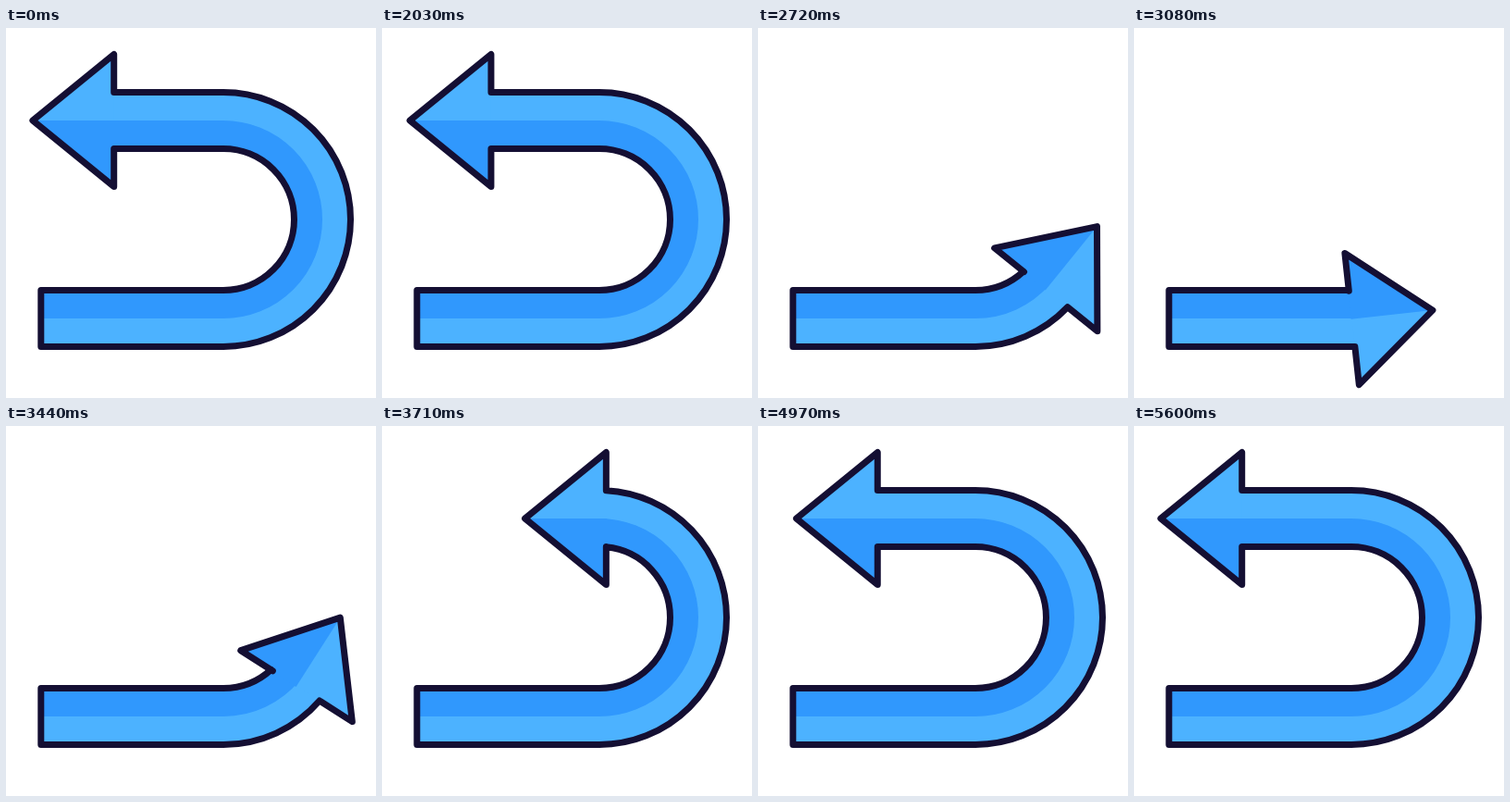
An HTML page with a canvas for the animation above (5.63 s loop, 400 px wide and 400 px high).

```html
<!DOCTYPE html>
<html lang="en">
<head>
<meta charset="utf-8">
<title>Return arrow</title>
<style>
  html, body { margin: 0; width: 100%; height: 100%; overflow: hidden; background: #fff; }
  canvas { display: block; width: 100vmin; height: 100vmin; }
</style>
</head>
<body>
<canvas id="stage" width="400" height="400"></canvas>
<script>
const ctx = document.getElementById('stage').getContext('2d');

const LOOP = 5630;
const LIGHT = '#4cb2ff', DARK = '#3098fd', INK = '#140f33';
const CX = 235, CY = 207, R = 107;     // bend of the shaft
const HALF = 30.5, START = 37.8;       // half thickness, left end
const BEND = Math.PI * R;
const REST = BEND + 118.3;             // distance of the head's base past the bend's start
const HEAD_LENGTH = 87.8, HEAD_HALF = 71.5;
const PIN = 10;                        // point of the head that rides on the course

// Each move: start, end, from, to, and the two horizontal easing handles.
const MOVES = [
  [2020, 3110, REST, 0, 0.1, 0.567],
  [3110, 4200, 0, REST + 25, 0.509, 0.391],
  [4200, 4930, REST + 25, REST - 12.7, 0.333, 0.667],
  [4930, 5600, REST - 12.7, REST, 0.333, 0.667]
];
const TURN = MOVES[1][0];

const clamp = (v, lo, hi) => Math.min(hi, Math.max(lo, v));

function ease(u, x1, x2) {
  let lo = 0, hi = 1;
  for (let i = 0; i < 24; i++) {
    const m = (lo + hi) / 2, n = 1 - m;
    const x = 3 * n * n * m * x1 + 3 * n * m * m * x2 + m * m * m;
    if (x < u) lo = m; else hi = m;
  }
  return lo * lo * (3 - 2 * lo);
}

function distanceAt(time) {
  for (const [start, end, from, to, x1, x2] of MOVES) {
    if (time >= start && time < end) {
      return from + (to - from) * ease((time - start) / (end - start), x1, x2);
    }
  }
  return REST;
}

// Traces the shaft's course at radius r, up to distance s past the bend's start.
function trace(r, s) {
  ctx.moveTo(START, CY + r);
  ctx.lineTo(CX + Math.min(s, 0), CY + r);
  if (s > 0) ctx.arc(CX, CY, r, Math.PI / 2, Math.PI / 2 - Math.min(s, BEND) / R, true);
  if (s > BEND) ctx.lineTo(CX - (s - BEND), CY - r);
}

function band(r, width, s, color) {
  ctx.beginPath();
  trace(r, s);
  ctx.lineCap = 'butt';
  ctx.lineWidth = width;
  ctx.strokeStyle = color;
  ctx.stroke();
}

function pointAt(s) {
  if (s > BEND) return [CX - (s - BEND), CY - R];
  const a = Math.max(s, 0) / R;
  return [CX + R * Math.sin(a) + Math.min(s, 0), CY + R * Math.cos(a)];
}

function polygon(points, color) {
  ctx.beginPath();
  points.forEach(p => ctx.lineTo(...p));
  ctx.closePath();
  ctx.fillStyle = color;
  ctx.fill();
}

function draw(time) {
  const s = distanceAt(time);
  const lead = time < TURN ? 11 : 11 + 9 * clamp(s / 80, 0, 1);
  const heading = clamp((s + lead) / R, 0, Math.PI);
  const skew = heading - clamp(s / R, 0, Math.PI);
  const shift = HALF * Math.sin(skew);

  const [px, py] = pointAt(s + PIN);
  const cos = Math.cos(heading), sin = Math.sin(heading);
  // Head coordinates: forward from its base, side away from the bend's centre.
  const at = (forward, side) => [
    px + (forward - PIN) * cos + side * sin,
    py - (forward - PIN) * sin + side * cos
  ];
  const tip = at(HEAD_LENGTH, 0);
  const inner = at(0, -HEAD_HALF), outer = at(0, HEAD_HALF);

  ctx.fillStyle = '#fff';
  ctx.fillRect(0, 0, 400, 400);

  band(R, HALF * 2, s + 7, LIGHT);
  band(R - HALF / 2, HALF, s + 7, DARK);
  polygon([inner, tip, outer], LIGHT);
  polygon([inner, tip, at(-1, 0), at(-1, -HALF)], DARK);

  ctx.beginPath();
  trace(R + HALF, s + shift * R / (R + HALF));
  trace(R - HALF, s - shift * R / (R - HALF));
  ctx.moveTo(START, CY + R - HALF);
  ctx.lineTo(START, CY + R + HALF);
  ctx.moveTo(...at(0, -HALF));
  [inner, tip, outer, at(0, HALF)].forEach(p => ctx.lineTo(...p));
  ctx.lineCap = ctx.lineJoin = 'round';
  ctx.lineWidth = 7;
  ctx.strokeStyle = INK;
  ctx.stroke();
}

const began = performance.now();
function tick() {
  draw((performance.now() - began) % LOOP);
  requestAnimationFrame(tick);
}
tick();
</script>
</body>
</html>
```
